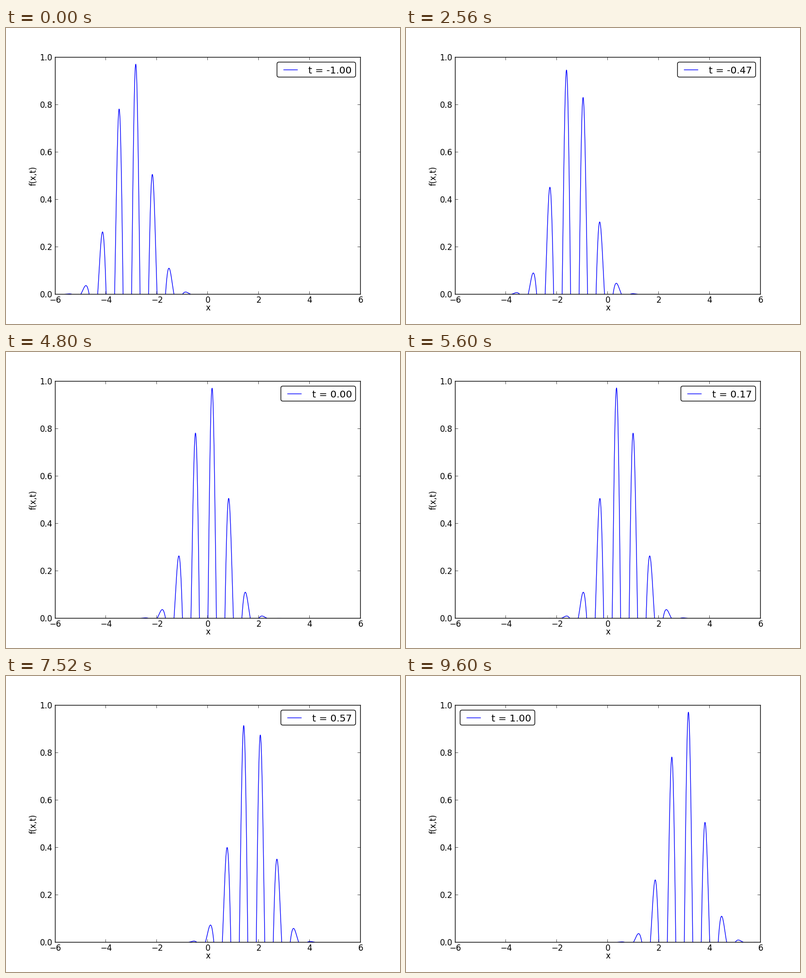
A matplotlib script that plays this animation: 812 by 612 pixels, repeating every 9760 ms.

```python
import numpy as np
import matplotlib.pyplot as plt
from matplotlib.animation import FuncAnimation
from matplotlib.patches import FancyBboxPatch

W, H, DPI = 812, 612, 100
EPS = 1e-3         # keeps the pixel size from rounding down
FRAMES, INTERVAL = 61, 160
LEFT, RIGHT, TOP, BOTTOM = 101.5, 730.8, 61.2, 550.8
# nudges that make crisp lines land on the wanted pixel
DX, DY = -0.95, -1.0
EM = 20            # legend font size in pixels
PAD = 0.5 * EM     # gap between legend and axes

plt.rcParams["font.family"] = "DejaVu Sans"
plt.rcParams["font.size"] = 12

fig = plt.figure(figsize=((W + EPS) / DPI, (H + EPS) / DPI), dpi=DPI, facecolor="white")


def add_axes(left, right, top, bottom):
    ax = fig.add_axes([left / W, 1 - bottom / H, (right - left) / W, (bottom - top) / H])
    ax.patch.set_visible(False)
    return ax


def wave(x, t):
    return np.exp(-(x - 3 * t) ** 2) * np.sin(3 * np.pi * (x - t))


# curve
plot = add_axes(LEFT, RIGHT, TOP, BOTTOM)
plot.set(xlim=(-6, 6), ylim=(0, 1))
plot.axis("off")
x = np.linspace(-6, 6, 1001)
curve, = plot.plot(x, wave(x, -1), color="blue", lw=1)

# border and ticks
frame = add_axes(LEFT + DX, RIGHT + DX, TOP + DY, BOTTOM + DY)
x_ticks = np.arange(-6, 7, 2)
y_ticks = np.arange(6) / 5
frame.set(xlim=(-6, 6), ylim=(0, 1), xticks=x_ticks, yticks=y_ticks)
frame.tick_params(direction="in", top=True, right=True, length=4, width=0.5,
                  labelbottom=False, labelleft=False)
for spine in frame.spines.values():
    spine.set_linewidth(1)

# labels and legend, in pixels with y pointing down
stage = add_axes(0, W, 0, H)
stage.set(xlim=(0, W), ylim=(H, 0))
stage.axis("off")

for v in x_ticks:
    px = LEFT + (v + 6) / 12 * (RIGHT - LEFT)
    stage.text(px, 568.2, str(v).replace("-", "\u2212"), ha="center", va="baseline")
for v in y_ticks:
    py = BOTTOM - v * (BOTTOM - TOP)
    stage.text(LEFT - 5.6, py + 6, f"{v:.1f}", ha="right", va="baseline")
stage.text((LEFT + RIGHT) / 2, 584.2, "x", ha="center", va="baseline")
stage.text(61.2, (TOP + BOTTOM) / 2, "f(x,t)", rotation=90, rotation_mode="anchor",
           ha="center", va="baseline")

box_top = TOP + PAD
box = FancyBboxPatch((0, box_top + DY), 100, 31, boxstyle="round,pad=0,rounding_size=4",
                     fc="white", ec="black", lw=1, snap=True, zorder=1)
stage.add_patch(box)
key, = stage.plot([0, 1], [box_top + 16 + DY] * 2, color="blue", lw=1, zorder=2)
label = stage.text(0, box_top + 23, "", fontsize=14.4, va="baseline", zorder=3)


def update(i):
    t = i / 30 - 1
    curve.set_ydata(wave(x, t))

    label.set_text(f"t = {t:.2f}")
    width = label.get_window_extent().width + 3.6 * EM
    # the legend jumps aside once a crest reaches it
    left = LEFT + PAD if i >= 59 else RIGHT - PAD - width
    box.set_x(left + DX)
    box.set_width(width)
    key.set_xdata([left + 0.7 * EM + DX, left + 2.1 * EM + DX])
    label.set_x(left + 3.2 * EM)
    return curve, box, key, label


anim = FuncAnimation(fig, update, frames=FRAMES, interval=INTERVAL,
                     repeat=True, repeat_delay=0, blit=False)
plt.show()
```
